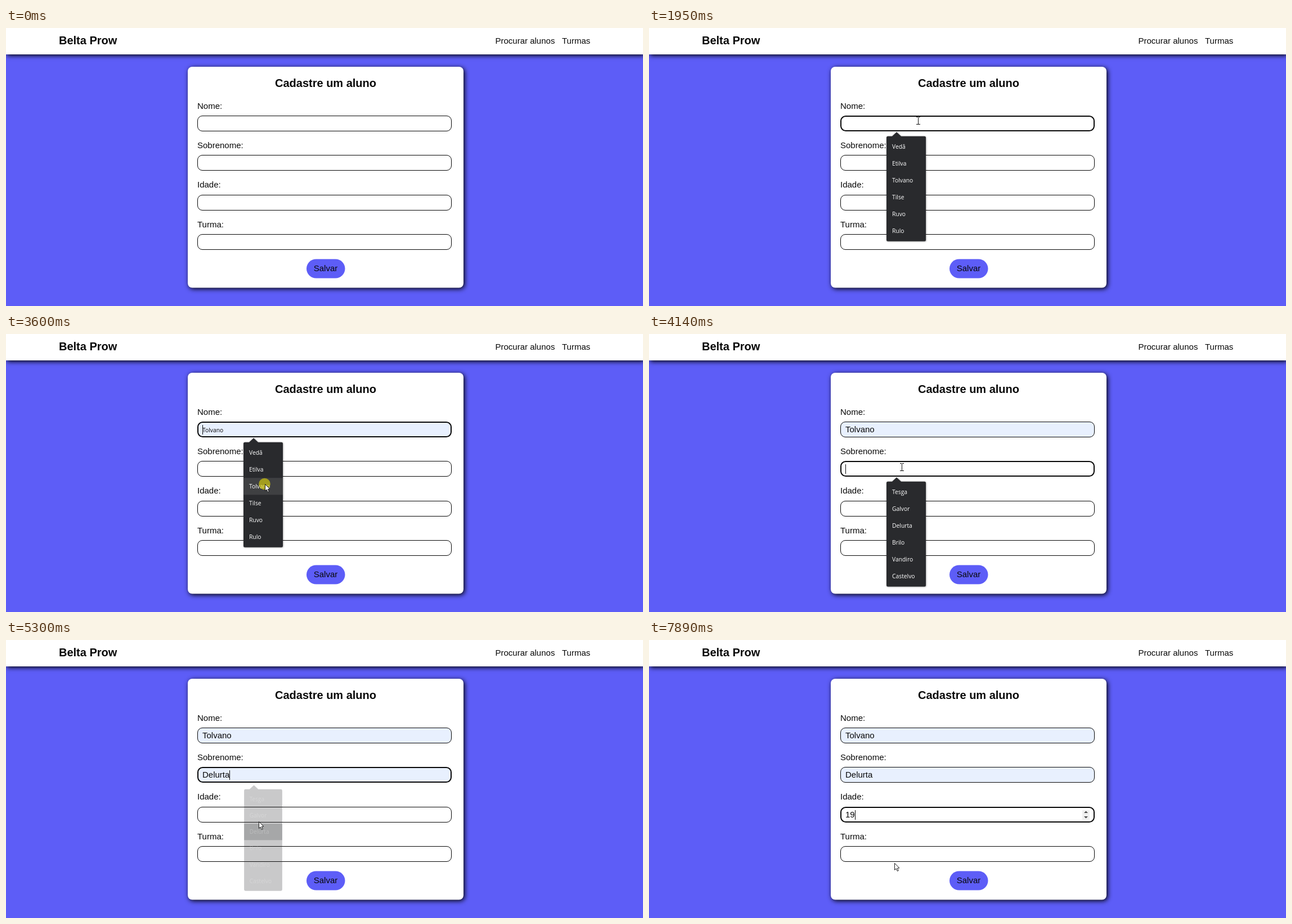
An HTML page with a canvas that plays this animation: 1132x495 px, repeating every 8000 ms.

```html
<!DOCTYPE html>
<html lang="pt">
<head>
<meta charset="utf-8">
<title>Cadastro</title>
<style>
  html, body { margin: 0; width: 100%; height: 100%; overflow: hidden; background: #5d5df7; }
  canvas { display: block; }
</style>
</head>
<body>
<canvas id="stage" width="1132" height="495"></canvas>
<script>
const ctx = document.getElementById('stage').getContext('2d');
const LOOP = 8000, BLINK = 525;
const BLUE = '#5d5df7', INK = '#080808', FILLED = '#e8f0fe';
const SANS = "'Liberation Sans', Arial, sans-serif";
const BODY = `15px ${SANS}`, HEADING = `bold 20px ${SANS}`, SMALL = "10.3px 'Open Sans', sans-serif";

const labels = ['Nome:', 'Sobrenome:', 'Idade:', 'Turma:'];
const FIELD = { x: 340, w: 452, h: 28 };
const fieldTop = i => Math.round(156.2 + 70.2 * i);

// Suggestion lists: hover holds the start time of each highlighted row
const popups = [
  { field: 0, open: 1950, pick: 3670, hover: [2480, 2690, 3200],
    items: ['Vedã', 'Etilva', 'Tolvano', 'Tilse', 'Ruvo', 'Rulo'] },
  { field: 1, open: 4010, pick: 5230, hover: [4480, 4610, 4810],
    items: ['Tesga', 'Galvor', 'Delurta', 'Brilo', 'Vandiro', 'Castelvo'] }
];
const POP = { x: 422, w: 70, h: 187, row: 30.1 };

const focusTimes = [1410, 3810, 5640];
const caretResets = [1410, 3670, 3810, 5230, 5640, 6710, 6840];
const presses = [[1410, 1470], [3530, 3670], [3810, 3940], [5160, 5230], [5640, 5700]];

// Pointer path: time, x, y
const path = [
  [250, 1032, 459], [660, 467, 139], [860, 467, 139], [1000, 476, 159], [1270, 478, 165],
  [2340, 478, 165], [2600, 453, 230], [2760, 454, 238], [3020, 454, 238], [3300, 460, 267],
  [3670, 460, 267], [3800, 449, 237], [4270, 449, 237], [4340, 449, 245], [4860, 449, 334],
  [5160, 449, 334], [5266, 449, 323], [5440, 448, 311], [7500, 448, 311],
  [7780, 437, 383], [7860, 436, 397]
];

const lastIndex = (times, t) => times.filter(v => v <= t).length - 1;

function pointerAt(t) {
  const q = Math.floor((t + 10) * 15 / 1000) * 1000 / 15;
  const i = lastIndex(path.map(k => k[0]), q);
  if (i < 0) return { x: path[0][1], y: path[0][2] };
  const a = path[i], b = path[i + 1] || a;
  let p = a === b ? 0 : (q - a[0]) / (b[0] - a[0]);
  if (i === 0) p = 1 - (1 - p) ** 2;
  return { x: a[1] + (b[1] - a[1]) * p, y: a[2] + (b[2] - a[2]) * p };
}

function popupAlpha(p, t) {
  if (t < p.open) return 0;
  const age = t - p.pick;
  return age < 0 ? 1 : age < 70 ? 0.75 : age < 140 ? 0.25 : 0;
}

function text(str, x, y, font = BODY, color = INK, align = 'left') {
  ctx.font = font;
  ctx.fillStyle = color;
  ctx.textAlign = align;
  ctx.fillText(str, x, y);
}

function roundRect(x, y, w, h, r) {
  ctx.beginPath();
  ctx.roundRect(x, y, w, h, r);
}

function poly(points) {
  ctx.beginPath();
  points.forEach(([x, y]) => ctx.lineTo(x, y));
  ctx.closePath();
}

function shadow(color, blur, offset) {
  ctx.shadowColor = color;
  ctx.shadowBlur = blur;
  ctx.shadowOffsetX = ctx.shadowOffsetY = offset;
}

function panel(x, y, w, h, r) {
  ctx.save();
  shadow('#000', 8, 2);
  ctx.fillStyle = '#fff';
  roundRect(x, y, w, h, r);
  ctx.fill();
  ctx.restore();
}

function drawPage() {
  ctx.fillStyle = BLUE;
  ctx.fillRect(0, 0, 1132, 495);
  panel(0, -10, 1132, 57, 0);
  text('Belta Prow', 94, 29, HEADING);
  text('Procurar alunos', 869.5, 28);
  text('Turmas', 988, 28);
  panel(323, 69, 490, 393.5, 8);
  text('Cadastre um aluno', 568, 104.5, HEADING, INK, 'center');
  labels.forEach((s, i) => text(s, 340, 144 + 70.2 * i));
  ctx.fillStyle = BLUE;
  roundRect(534, 411.5, 68.5, 34, 17);
  ctx.fill();
  text('Salvar', 568, 433, BODY, INK, 'center');
}

function drawSpinner(y) {
  ctx.fillStyle = '#f0f0f0';
  ctx.fillRect(770, y + 6, 13, 17);
  ctx.fillStyle = '#484848';
  for (const s of [-1, 1]) {
    const base = y + 14 + s * 3;
    poly([[773, base], [780, base], [776.5, base + s * 3.5]]);
    ctx.fill();
  }
}

function fieldState(i, t) {
  const p = popups[i];
  if (p) {
    if (t >= p.pick) return { value: p.items[2], filled: true };
    const row = lastIndex(p.hover, t);
    return row < 0 ? { value: '' } : { value: p.items[row], filled: true, preview: true };
  }
  return { value: i === 2 ? (t >= 6840 ? '19' : t >= 6710 ? '1' : '') : '' };
}

function drawField(i, t, hovered) {
  const y = fieldTop(i), { x, w, h } = FIELD;
  const focused = lastIndex(focusTimes, t) === i;
  const { value, filled, preview } = fieldState(i, t);
  const line = focused ? 2 : 1;
  roundRect(x + line / 2, y + line / 2, w - line, h - line, 8.5);
  ctx.fillStyle = filled ? FILLED : '#fff';
  ctx.fill();
  ctx.strokeStyle = INK;
  ctx.lineWidth = line;
  ctx.stroke();
  text(value, 349, y + (preview ? 18.5 : 19), preview ? SMALL : BODY);
  if (i === 2 && (focused || hovered)) drawSpinner(y);
  if (!focused) return;
  const since = t - caretResets[lastIndex(caretResets, t)];
  if (Math.floor(since / BLINK) % 2) return;
  const caretX = 349 + (preview ? 0 : Math.floor(ctx.measureText(value).width + 0.4));
  ctx.fillStyle = INK;
  ctx.fillRect(caretX, y + 6, 1, 17);
}

function drawPopup(p, t) {
  const alpha = popupAlpha(p, t);
  if (!alpha) return;
  const top = fieldTop(p.field) + 36.7;
  const cx = POP.x + POP.w / 2, cy = top + POP.h / 2;
  const scale = 1 - 0.043 * (1 - alpha);
  ctx.save();
  ctx.globalAlpha = alpha;
  ctx.translate(cx, cy);
  ctx.scale(scale, scale);
  ctx.translate(-cx, -cy);
  ctx.fillStyle = '#292a2d';
  ctx.save();
  if (alpha === 1) shadow('rgba(0,0,0,.4)', 3, 0.5);
  ctx.beginPath();
  ctx.roundRect(POP.x, top, POP.w, POP.h, 2.5);
  ctx.moveTo(432, top);
  ctx.lineTo(440, top - 7.5);
  ctx.lineTo(448, top);
  ctx.fill();
  ctx.restore();
  const row = lastIndex(p.hover, t);
  if (row >= 0) {
    ctx.fillStyle = '#3f4042';
    const first = row === 0 ? 3 : 0;
    ctx.fillRect(POP.x, top + 3.3 + row * POP.row - first, POP.w, POP.row + first);
  }
  p.items.forEach((s, i) => text(s, 432, top + 22 + i * POP.row, SMALL, '#fff'));
  ctx.restore();
}

function drawArrow(x, y) {
  ctx.save();
  ctx.translate(x + 0.5, y + 0.5);
  poly([[0, 0], [0, 12], [2.7, 9.5], [4.8, 14], [6.8, 13.1], [4.8, 8.8], [8.4, 8.5]]);
  ctx.fillStyle = '#fff';
  ctx.fill();
  ctx.strokeStyle = '#111';
  ctx.lineWidth = 0.95;
  ctx.stroke();
  ctx.restore();
}

function drawIBeam(x, y) {
  x = Math.round(x);
  y = Math.round(y);
  ctx.fillStyle = '#111';
  ctx.fillRect(x, y - 6, 1, 13);
  for (const end of [y - 7, y + 6]) {
    ctx.fillRect(x - 3, end, 3, 1);
    ctx.fillRect(x + 1, end, 3, 1);
  }
}

function draw(t) {
  const at = pointerAt(t);
  const visible = t >= path[0][0];
  const overPopup = popups.some(p => {
    const top = fieldTop(p.field) + 36;
    return popupAlpha(p, t) && at.x > POP.x && at.x < POP.x + POP.w && at.y > top && at.y < top + POP.h;
  });
  const hovered = !visible || overPopup ? -1 : labels.findIndex((_, i) =>
    at.x > FIELD.x && at.x < FIELD.x + FIELD.w && at.y > fieldTop(i) && at.y < fieldTop(i) + FIELD.h);

  drawPage();
  labels.forEach((_, i) => drawField(i, t, hovered === i));
  popups.forEach(p => drawPopup(p, t));
  if (!visible) return;
  if (presses.some(([down, up]) => t >= down && t < up)) {
    ctx.fillStyle = 'rgba(225,215,10,.62)';
    ctx.beginPath();
    ctx.arc(at.x - 0.5, at.y, 10.3, 0, Math.PI * 2);
    ctx.fill();
  }
  (hovered >= 0 ? drawIBeam : drawArrow)(at.x, at.y);
}

const start = performance.now();
function tick() {
  draw((performance.now() - start) % LOOP);
  requestAnimationFrame(tick);
}
tick();
</script>
</body>
</html>
```
